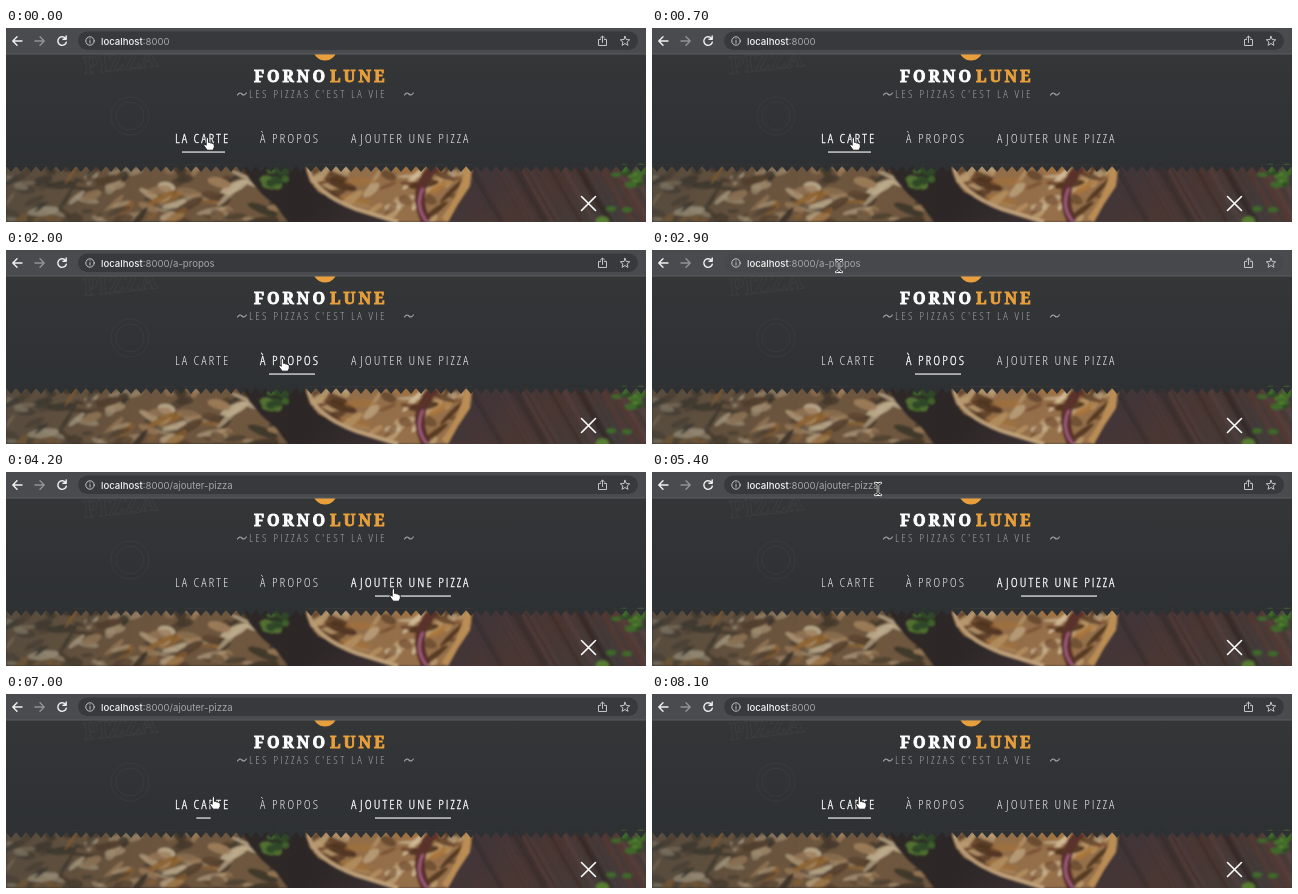
Recreate the animation shown at these times as an HTML page. Size 640 px wide and 194 px high, loop 8.2 s.

```html
<!DOCTYPE html>
<html lang="fr">
<head>
<meta charset="utf-8">
<title>Menu</title>
<style>
html, body { margin: 0; width: 100%; height: 100%; overflow: hidden; background: #2e3134; }
svg { display: block; width: 640px; height: 194px; }
.url { font: 400 9.6px Inter, Roboto, sans-serif; fill: #a3a5a8; }
.url .host { fill: #f4f4f4; font-weight: 500; }
.brand { font: 900 16px "Noto Serif", serif; letter-spacing: 3px; stroke-width: .9; }
.tag, .nav { font-family: "Open Sans Condensed Light", "Open Sans Condensed", "Open Sans", sans-serif; font-stretch: 75%; font-weight: 300; }
.tag { font-size: 11.5px; letter-spacing: 2.3px; fill: #a0a2a4; }
.nav { font-size: 13.5px; letter-spacing: 2px; fill: #e8e9ea; }
.nav.on { fill: #fff; stroke: #fff; stroke-width: .3; }
.chalk { font: 900 24px "Noto Serif", serif; fill: none; stroke: #fff; opacity: .035; }
.line { fill: none; stroke-linecap: round; stroke-linejoin: round; }
</style>
</head>
<body>
<svg viewBox="0 0 640 194">
  <defs>
    <linearGradient id="board" x2="0" y2="1">
      <stop offset="0" stop-color="#353738"/><stop offset="1" stop-color="#2e3134"/>
    </linearGradient>
    <linearGradient id="wood" x2="1" y2=".1">
      <stop offset="0" stop-color="#2b2625"/><stop offset=".55" stop-color="#2b2425"/>
      <stop offset=".75" stop-color="#43363a"/><stop offset=".88" stop-color="#4b3733"/>
      <stop offset="1" stop-color="#443c3a"/>
    </linearGradient>
    <linearGradient id="shade">
      <stop offset="0" stop-color="#3d3f3c" stop-opacity=".6"/>
      <stop offset=".2" stop-color="#3a3732" stop-opacity=".25"/>
      <stop offset="1" stop-color="#3a3732" stop-opacity="0"/>
    </linearGradient>
    <filter id="soft" x="-5%" y="-20%" width="110%" height="140%"><feGaussianBlur stdDeviation=".9"/></filter>
    <clipPath id="leftPie"><path d="M0 138H236L244 152 256 166 270 178 282 194H0Z"/></clipPath>
    <clipPath id="slice"><path d="M299 138H466L464 158 452 176 442 194H392L350 181 312 164 303 152Z"/></clipPath>
  </defs>

  <rect width="640" height="140" fill="url(#board)"/>
  <g class="chalk">
    <text x="78" y="46" transform="rotate(-6 78 46)">PIZZA</text>
    <circle cx="124" cy="88" r="19"/><circle cx="124" cy="88" r="14"/>
  </g>

  <g id="photo">
    <rect y="138" width="640" height="56" fill="url(#wood)"/>
    <g filter="url(#soft)">
      <g id="grain" fill="none"/>
      <g clip-path="url(#leftPie)"><rect y="138" width="320" height="56" fill="#7c5f42"/><g id="leftBits"/></g>
      <g clip-path="url(#slice)">
        <rect x="295" y="138" width="175" height="56" fill="#a1774d"/><g id="sliceBits"/>
        <path d="M430 138Q404 160 420 194" stroke="#5f3029" stroke-width="10" fill="none"/>
        <path d="M417 160Q408 178 421 194" stroke="#b0608c" stroke-width="2.5" fill="none"/>
        <path d="M466 138Q461 168 441 194" stroke="#c79658" stroke-width="13" fill="none"/>
      </g>
      <path d="M302 141Q309 166 350 181L392 194" stroke="#d3b083" stroke-width="4" fill="none"/>
      <g id="leaves"/>
    </g>
    <rect y="138" width="640" height="56" fill="url(#shade)"/>
  </g>
  <path id="teeth" fill="#2e3134"/>

  <circle cx="319" cy="20.5" r="12" fill="#e9a03c"/>
  <text class="brand" x="248" y="54" fill="#fff" stroke="#fff">FORNO</text>
  <text class="brand" x="324" y="54" fill="#e9a03c" stroke="#e9a03c">LUNE</text>
  <text class="tag" x="243" y="70">LES PIZZAS C'EST LA VIE</text>
  <g class="line" stroke="#a0a2a4" stroke-width="1.2">
    <path d="M231.5 67q2.2-3.4 4.4-1t4.4-1M398.5 67q2.2-3.4 4.4-1t4.4-1"/>
  </g>
  <g id="menu"></g>
  <path d="M575.5 168.5l14 14M589.5 168.5l-14 14" class="line" stroke="#fff" stroke-width="1.6"/>

  <rect width="640" height="26" fill="#4a4b4e"/>
  <rect y="25.5" width="640" height="1" fill="#5b5c5f"/>
  <rect id="pill" x="72" y="3.5" width="560" height="18.5" rx="9.2"/>
  <g class="line" stroke="#f1f1f1" stroke-width="1.4">
    <path d="M16 13H7M11 8.8 6.8 13 11 17.2"/>
    <path d="M29 13h9M34 8.8 38.2 13 34 17.2" stroke="#929396"/>
    <path d="M59.4 10.2A4.3 4.3 0 1 0 60.3 14.2M60.2 8v3.2H57"/>
  </g>
  <g class="line" stroke="#c2c4c6">
    <circle cx="84" cy="13" r="4.2"/><path d="M84 12.6v2.5M84 10.8v.1"/>
    <path d="M594.5 11.5H592.5V17.5H600.5V11.5H598.5M596.5 14.5V8.3M594.3 10.2 596.5 8 598.7 10.2"/>
    <path id="star"/>
  </g>
  <text class="url" x="95" y="16.5"><tspan class="host">localhost</tspan><tspan>:8000</tspan><tspan id="path"></tspan></text>

  <g id="cursor">
    <path id="hand" class="line" d="M-2.8 1V-5q0-1.4 1.2-1.4T-.4-5V-1.4Q1-2.4 1.8-.9 3.2-1.6 3.7-.3 5.3-.6 5.3 1V3.2L4 6.2H-1.8L-5 1.8Q-5.6.2-4.3 .1Z" style="fill:#fff" stroke="#161616" stroke-width=".9"/>
    <path id="arrow" d="M-3-6V5L-.5 2.6 1.2 6.4 3 5.6 1.3 2H4.8Z" fill="#111" stroke="#fff" stroke-width=".9"/>
    <g id="beam" class="line">
      <path d="M-2.8-6Q0-6 0-4V4Q0 6-2.8 6M2.8-6Q0-6 0-4M0 4Q0 6 2.8 6" stroke="#fff" stroke-width="2.4"/>
      <path d="M-2.8-6Q0-6 0-4V4Q0 6-2.8 6M2.8-6Q0-6 0-4M0 4Q0 6 2.8 6" stroke="#151515"/>
    </g>
  </g>
</svg>
<script>
const LOOP = 8200, STEP = 100;
const $ = id => document.getElementById(id);
const add = (parent, tag, attrs, text = '') => {
  const el = document.createElementNS('http://www.w3.org/2000/svg', tag);
  for (const k in attrs) el.setAttribute(k, attrs[k]);
  el.textContent = text;
  return parent.appendChild(el);
};

// Soft food and wood textures
let seed = 17;
const rnd = (a, b) => {
  seed = (seed * 16807) % 2147483647;
  return a + (b - a) * seed / 2147483647;
};
const pick = list => list[Math.floor(rnd(0, list.length))];
function scatter(parent, count, x0, x1, colors) {
  for (let i = 0; i < count; i++) {
    const x = rnd(x0, x1), y = rnd(138, 194);
    add(parent, 'ellipse', {
      cx: x, cy: y, rx: rnd(5, 18), ry: rnd(1.5, 5), fill: pick(colors), opacity: rnd(.5, .95),
      transform: `rotate(${rnd(-65, 30)} ${x} ${y})`
    });
  }
}
scatter($('leftBits'), 130, 0, 285, ['#d0b48c', '#e0cba6', '#473829', '#a9702f', '#5c412b', '#3b3428', '#b99165']);
scatter($('sliceBits'), 60, 300, 455, ['#d6b481', '#e6cfa6', '#76482a', '#b97d3a', '#54351f', '#c79c66']);
for (const [x, y, n] of [[270, 151, 16], [620, 149, 12], [610, 186, 3]])
  for (let i = 0; i < n; i++)
    add($('leaves'), 'ellipse', {
      cx: x + rnd(-15, 15), cy: y + rnd(-10, 9), rx: rnd(3, 7), ry: rnd(2, 5),
      fill: pick(['#3f6a2a', '#587f32', '#2d4b25'])
    });
for (let i = 0; i < 26; i++) {
  const x = rnd(455, 640);
  add($('grain'), 'path', {
    d: `M${x} 138q14 26 32 56`, 'stroke-width': rnd(1, 6), opacity: rnd(.25, .7),
    stroke: pick(['#231b1c', '#5d4542', '#593a33', '#4a3f43'])
  });
}

let zig = 'M0 137';
for (let x = 0; x <= 640; x += 10) zig += `L${x} 138L${x + 5} 144`;
$('teeth').setAttribute('d', zig + 'V137Z');

const star = [...Array(10).keys()].map(i => {
  const r = i % 2 ? 2.2 : 5, a = i * Math.PI / 5;
  return `${619 + r * Math.sin(a)} ${13.3 - r * Math.cos(a)}`;
});
$('star').setAttribute('d', `M${star.join('L')}Z`);

// Menu: label, text x, bar centre, bar width, hover start
const links = [
  ['LA CARTE', 169, 197.5, 43, 6900],
  ['À PROPOS', 254, 286, 46, 1200],
  ['AJOUTER UNE PIZZA', 345, 407, 76, 3700]
].map(([label, x, mid, width, hover]) => ({
  mid, width, hover,
  text: add($('menu'), 'text', { class: 'nav', x, y: 115 }, label),
  bar: add($('menu'), 'rect', { y: 123.5, height: 1.1, fill: '#fff' })
}));

// Page loads: time, active link, path
const pages = [[0, 0, ''], [1800, 1, '/a-propos'], [4000, 2, '/ajouter-pizza'], [7500, 0, '']];

// Pointer stops: time, x, y
const stops = [
  [0, 203, 116], [800, 203, 116], [1300, 278, 115], [2200, 278, 115],
  [2700, 187, 16], [3200, 187, 16], [3800, 389, 123], [4700, 389, 123],
  [5400, 226, 17], [6300, 226, 17], [6900, 209, 109], [LOOP, 209, 109]
];
const clamp = v => Math.max(0, Math.min(1, v));
const ease = v => v * v * (3 - 2 * v);

function pointer(t) {
  const i = stops.findIndex(s => s[0] > t);
  const [t0, x0, y0] = stops[i - 1], [t1, x1, y1] = stops[i];
  const k = ease((t - t0) / (t1 - t0));
  return [x0 + (x1 - x0) * k, y0 + (y1 - y0) * k];
}

function draw(t) {
  const [, active, path] = pages.filter(p => p[0] <= t).pop();
  $('path').textContent = path;

  links.forEach((link, i) => {
    const grow = t >= link.hover && t < link.hover + 900 ? clamp((t - link.hover) / 300) : 0;
    const w = link.width * (i === active ? 1 : grow);
    link.bar.setAttribute('x', link.mid - w / 2);
    link.bar.setAttribute('width', w);
    link.text.classList.toggle('on', w > 0);
  });

  const [x, y] = pointer(t);
  const inLink = y > 98 && y < 130 &&
    links.some(l => Math.abs(x - l.mid) < l.width / 2 + 26);
  const kind = y < 26 ? 'beam' : inLink ? 'hand' : 'arrow';
  for (const id of ['beam', 'hand', 'arrow']) $(id).style.display = id === kind ? '' : 'none';
  $('cursor').setAttribute('transform', `translate(${x} ${y})`);

  // The address field lights up shortly after the pointer enters it
  const lit = y < 22 && pointer(Math.max(0, t - 200))[1] < 22;
  $('pill').setAttribute('fill', lit ? '#47484b' : '#38393c');
}

const start = performance.now();
function tick() {
  const t = (performance.now() - start) % LOOP;
  draw(Math.floor(t / STEP) * STEP);
  requestAnimationFrame(tick);
}
tick();
</script>
</body>
</html>
```
